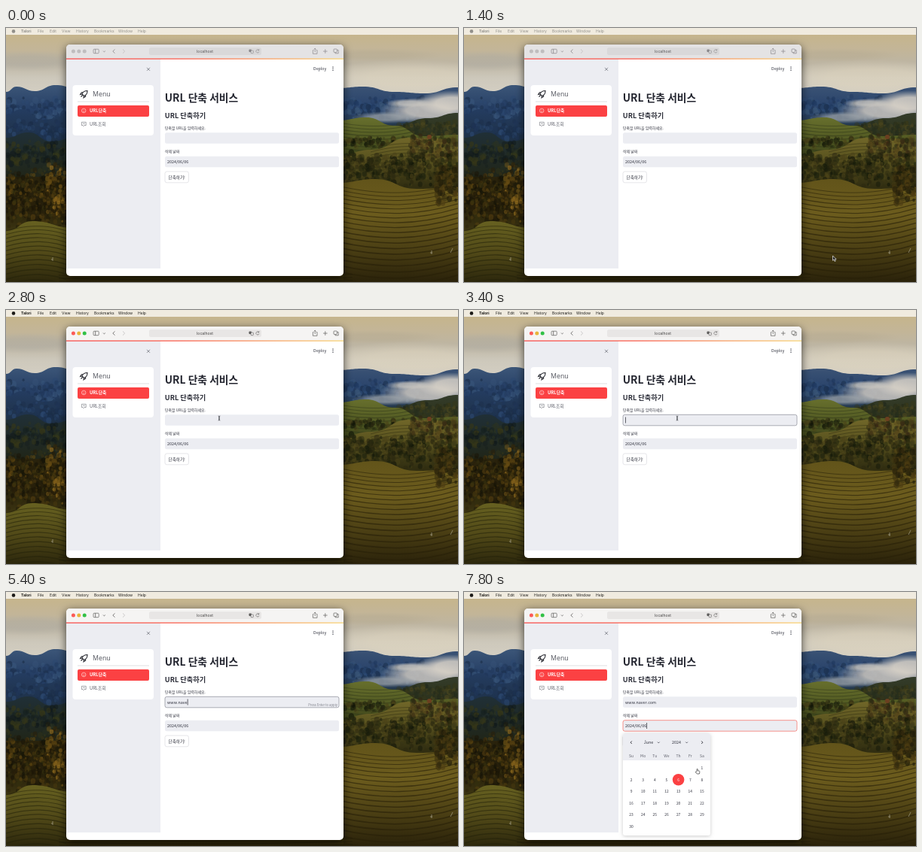
An HTML page with a canvas that plays this animation: 600 by 338 pixels, repeating every 8000 ms.

```html
<!DOCTYPE html>
<html lang="ko">
<head>
<meta charset="utf-8">
<style>
html, body { margin: 0; width: 100%; height: 100%; overflow: hidden; }
canvas { display: block; width: 600px; height: 338px; }
</style>
</head>
<body>
<canvas id="stage" width="600" height="338"></canvas>
<script>
const W = 600, H = 338, LOOP = 8000, STEP = 200;
const SANS = '"Noto Sans CJK KR", "Noto Sans CJK JP", "Noto Sans CJK", sans-serif';
const UI = 'Inter, sans-serif';
const INK = '#31333f', RED = '#fb4143', FIELD = '#ecedf2';
const stage = document.getElementById('stage').getContext('2d');
let g = stage;

// ---------- helpers ----------
let seed = 7;
const rand = () => (seed = (seed * 16807) % 2147483647) / 2147483647;

function text(s, x, y, size, color = INK, weight = 400, family = SANS, align = 'left') {
  g.font = `${weight} ${size}px ${family}`;
  g.fillStyle = color;
  g.textAlign = align;
  g.fillText(s, x, y);
}

function box(x, y, w, h, r, fill, stroke, width = 0.7) {
  g.beginPath();
  g.roundRect(x, y, w, h, r);
  if (fill) { g.fillStyle = fill; g.fill(); }
  if (stroke) { g.strokeStyle = stroke; g.lineWidth = width; g.stroke(); }
}

function dot(x, y, r, fill) {
  g.beginPath();
  g.arc(x, y, r, 0, 7);
  g.fillStyle = fill;
  g.fill();
}

function line(d, color, width = 0.8, fill) {
  const path = new Path2D(d);
  if (fill) { g.fillStyle = fill; g.fill(path); }
  g.strokeStyle = color;
  g.lineWidth = width;
  g.stroke(path);
}

function gradient(y0, y1, ...colors) {
  const fill = g.createLinearGradient(0, y0, 0, y1);
  colors.forEach((c, i) => fill.addColorStop(i / (colors.length - 1), c));
  return fill;
}

// ---------- landscape ----------
function ridge(points, fill, bottom) {
  g.beginPath();
  g.moveTo(points[0][0], bottom);
  g.lineTo(...points[0]);
  for (let i = 1; i < points.length; i++) {
    const [ax, ay] = points[i - 1], [bx, by] = points[i], mid = (ax + bx) / 2;
    g.bezierCurveTo(mid, ay, mid, by, bx, by);
  }
  g.lineTo(points[points.length - 1][0], bottom);
  g.fillStyle = fill;
  g.fill();
}

function foliage(x, y, w, h, count, colors, size) {
  for (let i = 0; i < count; i++) {
    const depth = i / count, r = size * (0.5 + rand());
    g.globalAlpha = 0.3 + rand() * 0.4;
    g.beginPath();
    g.ellipse(x + rand() * w, y + h * (depth * 0.7 + rand() * 0.3), r, r * 1.2, 0, 0, 7);
    g.fillStyle = colors[Math.floor(rand() * colors.length)];
    g.fill();
  }
  g.globalAlpha = 1;
}

function haze(x, y, rx, ry, color) {
  g.save();
  g.translate(x, y);
  g.scale(rx, ry);
  const fill = g.createRadialGradient(0, 0, 0, 0, 0, 1);
  fill.addColorStop(0, color);
  fill.addColorStop(0.45, color);
  fill.addColorStop(1, color.slice(0, 7) + '00');
  g.fillStyle = fill;
  g.fillRect(-1, -1, 2, 2);
  g.restore();
}

function rows(x, w, y, gap, count, bend, color) {
  g.strokeStyle = color;
  for (let i = 0; i < count; i++) {
    const top = y + gap * i * (1 + i * 0.02);
    g.lineWidth = 0.9 + i * 0.06;
    g.beginPath();
    g.moveTo(x, top);
    g.bezierCurveTo(x + w * 0.35, top + bend, x + w * 0.65, top + bend, x + w, top - bend * 0.4);
    g.stroke();
  }
}

function drawSky() {
  g.fillStyle = gradient(8, 86, '#c6b58c', '#c3b597', '#bdb5a3', '#cdc8bb', '#d3cec2');
  g.fillRect(0, 0, W, H);
  haze(540, 66, 130, 24, '#e0d6bf88');
  haze(30, 44, 80, 14, '#a9a79f66');
  haze(490, 36, 90, 9, '#b3a88f66');
}

function drawLeftHills() {
  const blues = ['#1f3558', '#2c4870', '#1b2e49', '#38557a'];
  const deep = ['#18211f', '#2a3220', '#111a1b', '#363718'];
  const autumn = ['#1a1507', '#2a210b', '#4b390f', '#131207', '#654a12', '#35300f'];
  ridge([[0, 85], [14, 78], [38, 84], [66, 76], [100, 82]], gradient(76, 140, '#3c5678', '#263f65', '#1c3048'), 240);
  foliage(0, 90, 80, 50, 130, blues, 3);
  ridge([[0, 116], [20, 108], [48, 122], [100, 111]], gradient(108, 160, '#243c60', '#1c2d40'), 240);
  foliage(0, 122, 80, 28, 80, blues.slice(0, 3), 2.5);
  ridge([[0, 146], [30, 139], [60, 151], [100, 143]], gradient(140, 195, '#202f36', '#20261a'), 240);
  foliage(0, 148, 80, 44, 150, deep, 2.8);
  g.fillStyle = gradient(190, H, '#2a240d', '#251e0a', '#4b4316', '#2c270c');
  g.fillRect(0, 198, 90, 140);
  foliage(0, 184, 80, 84, 420, autumn, 2.2);
  ridge([[0, 270], [35, 257], [90, 266]], gradient(258, H, '#666020', '#524a18', '#2c270c'), H);
  rows(0, 90, 270, 4.8, 14, -9, '#26230a99');
  foliage(54, 172, 26, 92, 120, ['#80601a', '#33270b', '#5d4512', '#936d20', '#241c09'], 2.2);
}

function drawRightHills() {
  const grove = ['#1c210d', '#353214', '#141809', '#4b4319', '#2b2810'];
  ridge([[440, 80], [474, 78], [516, 85], [556, 87], [W, 79]], gradient(78, 135, '#3a5274', '#28426a', '#26394a'), 180);
  foliage(448, 90, 105, 32, 150, ['#1f385f', '#2f4c76', '#1b2f4c', '#3a5677'], 3);
  haze(560, 110, 64, 18, '#c9c5bfdd');
  haze(505, 119, 46, 8, '#a9aeb1aa');
  haze(592, 100, 48, 17, '#d6d0c6dd');
  haze(535, 100, 32, 6, '#d0ccc4aa');
  ridge([[440, 128], [478, 122], [516, 130], [560, 120], [W, 113]], gradient(112, 150, '#343c2a', '#2b301a'), 210);
  foliage(520, 122, 80, 24, 120, ['#22291b', '#383819', '#4b461f', '#272e1c'], 2.3);
  ridge([[440, 123], [478, 119], [516, 130], [555, 144], [W, 142]], gradient(120, 180, '#666e2c', '#515922', '#353b17'), 220);
  rows(448, 92, 127, 4.2, 8, 5, '#30381988');
  foliage(448, 145, 88, 15, 90, grove, 2.2);
  ridge([[440, 170], [485, 162], [535, 146], [570, 147], [W, 154]], gradient(145, 210, '#716729', '#57511e', '#312e11'), 240);
  g.save();
  g.beginPath();
  g.rect(484, 150, 70, 48);
  g.clip();
  rows(480, 120, 162, 4, 10, -12, '#32301288');
  g.restore();
  foliage(536, 139, 64, 40, 150, ['#382713', '#302d14', '#5b4a1c', '#20220f'], 2.4);
  dot(562, 145, 3, '#6b3f20');
  foliage(448, 164, 152, 48, 440, grove, 2.6);
  ridge([[440, 206], [490, 201], [545, 214], [W, 212]], gradient(202, H, '#62541a', '#6c5c1d', '#4c4014', '#2a220a'), H);
  rows(440, 165, 210, 5, 22, 13, '#282009a0');
  foliage(570, 178, 30, 58, 110, ['#1e1b0a', '#332b0e', '#4f3e13'], 2.7);
}

function drawLandscape() {
  drawSky();
  drawLeftHills();
  drawRightHills();
  g.fillStyle = gradient(324, H, '#43390f', '#2a230a');
  g.fillRect(80, 324, 368, 14);
  rows(70, 390, 329, 4, 3, 3, '#221d08aa');
  line('M62 305v5m-2-2h2M565 296v5m-2-2h3M593 293l-3 6', '#a8a28a', 0.7);
  g.fillStyle = '#f0ebdf';
  g.fillRect(0, 0, W, 9);
}

// ---------- browser ----------
const MENU = [['Talori', 20], ['File', 42], ['Edit', 58], ['View', 74], ['History', 93],
  ['Bookmarks', 117], ['Window', 149], ['Help', 175]];

function drawMenuBar(active) {
  const color = active ? '#1d1b18' : '#92908b';
  dot(10, 4.4, 2.3, color);
  MENU.forEach(([label, x], i) => text(label, x, 6.3, 5, color, i ? 400 : 700, UI));
}

function drawToolbar(active) {
  const field = active ? '#e8e6e5' : '#d9d8d9';
  box(80, 22, 368, 25, [5, 5, 0, 0], active ? '#f5f4f3' : '#e4e3e4');
  const lights = active ? ['#fc5b57', '#e8b43a', '#32c146'] : ['#bfbdbe', '#bfbdbe', '#bfbdbe'];
  lights.forEach((c, i) => dot(89.4 + i * 7.4, 31, 2.5, c));
  const icon = active ? '#5d5c5b' : '#88868a';
  box(116, 28.2, 7.2, 5.5, 1, null, icon);
  line('M118.7 28.2v5.5M129 30.5l1.4 1.4 1.4-1.4M144.5 28.4l-2.7 2.6 2.7 2.6', icon);
  line('M155 28.4l2.7 2.6-2.7 2.6', '#c0bebf');
  box(190, 26, 149, 10, 2.5, field);
  text('localhost', 264, 33, 5.1, active ? '#424140' : '#555356', 400, UI, 'center');
  box(322.5, 28.5, 3.4, 3.6, 0.8, icon);
  box(325, 30, 3.4, 3.6, 0.8, field, icon, 0.6);
  line('M335.6 29.5a2.1 2.1 0 1 0 .4 2M335.8 28v1.8h-1.8', icon, 0.6);
  line('M408.4 29.5h-1v4.8h5.6v-4.8h-1M410.2 32v-5m-1.4 1.4l1.4-1.4 1.4 1.4M421 31h5.6M423.8 28.2v5.6', icon, 0.7);
  box(435, 28, 4.4, 4.4, 0.8, null, icon);
  line('M437 32.4v1.4h4.2v-4.4h-1.8', icon, 0.7);
}

function drawSidebar() {
  g.fillStyle = '#ecedf2';
  g.fillRect(80, 41, 125, 279);
  line('M187 52.8l4 4m0-4l-4 4', '#5e606b', 0.7);
  box(88.5, 76, 107.5, 67, 4, '#fff');
  line('M101 88c1-3 4-4.5 7-4.5 0 3-1.5 6-4.5 7zM101 88l-2.4.5 1.7-2.7h2M103.5 90.5l-.5 2.4 2.6-1.7v-2M99.5 91.5l2-2', '#2b2c33', 1.1);
  text('Menu', 115, 91.3, 8.8, '#51535c', 400, '"Open Sans", "Noto Sans", sans-serif');
  line('M95 98h95', '#c9cace', 0.6);
  box(95, 103, 95, 15, 2, RED);
  line('M106 110a2.8 2.8 0 1 1-5.6 0a2.8 2.8 0 1 1 5.6 0M101.8 110.7q1.4 1.7 2.8 0M102 109h.6m1.1 0h.6', '#ffd0ce', 0.7);
  text('URL단축', 111, 112.2, 5.8, '#fff', 700);
  line('M100.4 125.3h5.8v4.2h-2.2l-1 1.3-1-1.3h-1.6zM102 127.3h2.8', '#6b6c74', 0.6);
  text('URL조회', 111, 130.2, 5.8, '#5b5d67');
}

function caret(x, y) {
  g.fillStyle = '#22232c';
  g.fillRect(x, y, 0.7, 8);
}

function drawPage(typed, urlFocus, dateFocus) {
  text('Deploy', 408, 56.3, 5.3, INK, 500);
  for (const y of [52, 54.2, 56.4]) dot(434, y, 0.65, INK);
  text('URL 단축 서비스', 210.8, 98, 13.8, '#23252f', 700);
  text('URL 단축하기', 210.8, 120.2, 9.2, '#2b2d38', 600);
  text('단축할 URL을 입력하세요.', 211, 135, 4.95, INK, 500);
  box(211, 139.3, 231, 14.5, 2.5, FIELD, urlFocus && '#898b95');
  text(typed, 214, 148.8, 5.4);
  if (urlFocus) caret(214.2 + g.measureText(typed).width, 142.5);
  if (urlFocus && typed) text('Press Enter to apply', 440, 152.3, 4.2, '#7d7f88', 400, SANS, 'right');
  text('삭제 날짜', 211, 166, 4.95, INK, 500);
  box(211, 170.7, 231, 14.5, 2.5, FIELD, dateFocus && '#f7685e');
  text('2024/06/06', 214, 180, 5.4);
  if (dateFocus) caret(214.2 + g.measureText('2024/06/06').width, 174);
  box(211, 191, 31.5, 14.8, 2.5, '#fff', '#d5d6da', 0.6);
  text('단축하기!', 226.7, 200.5, 5.6, INK, 500, SANS, 'center');
}

function drawCalendar() {
  const column = i => 222 + i * 15.65;
  const label = (s, x, y, size = 4.9, color = INK) => text(s, x, y, size, color, 500, SANS, 'center');
  g.save();
  g.shadowColor = '#0003';
  g.shadowBlur = 5;
  g.shadowOffsetY = 1;
  box(211, 188, 116, 136, 3, '#fff');
  g.restore();
  box(211, 188, 116, 36, [3, 3, 0, 0], FIELD);
  line('M222.8 198.4l-1.7 1.8 1.7 1.8M315.2 198.4l1.7 1.8-1.7 1.8', '#292a33', 0.9);
  label('June', 245, 202, 5.5);
  label('2024', 282, 202, 5.4);
  line('M257 199.6l1.3 1.3 1.3-1.3M294.3 199.6l1.3 1.3 1.3-1.3', INK, 0.8);
  ['Su', 'Mo', 'Tu', 'We', 'Th', 'Fr', 'Sa'].forEach((s, i) => label(s, column(i), 219.8, 5.1, '#60626d'));
  for (let day = 1; day <= 30; day++) {
    const cell = day + 5, x = column(cell % 7), y = 234.2 + Math.floor(cell / 7) * 15.6;
    if (day === 6) dot(x, y, 7.8, RED);
    label(day, x, y + 1.8, 4.9, day === 6 ? '#fff' : INK);
  }
}

// ---------- pointer ----------
const POINTERS = {
  arrow: ['M0 0v6.4l1.5-1.3 1.1 2.5 1.2-.6-1.1-2.3h2z', '#eee', '#222'],
  beam: ['M-1.3-3q1.3 0 1.3 1v4q0 1-1.3 1M1.3-3q-1.3 0-1.3 1v4q0 1 1.3 1', '#33343b'],
  hand: ['M-1 .8v-3q.7-1 1.3 0v2l2 .4q.8.3.6 1.3l-.6 2.5h-3l-2-2.2q0-1.1 1-.6z', '#333', '#fff']
};
// time, x, y, shape; a null shape hides the pointer
const TRACK = [
  [0, 491, 306, null], [1000, 497, 334, 'arrow'], [1200, 491, 306, 'arrow'], [1600, 491, 306, 'arrow'],
  [2400, 283, 147, 'beam'], [2600, 283, 144, 'beam'], [3800, 283, 144, null],
  [6800, 283, 144, 'beam'], [7200, 242, 177, 'beam'], [7400, 242, 178, 'beam'],
  [7600, 274, 205, 'hand'], [7800, 310, 238, 'hand'], [8000, 310, 238, 'hand']
];

function drawPointer(t) {
  const i = TRACK.findIndex((p, n) => n < TRACK.length - 1 && t < TRACK[n + 1][0]);
  const [t0, x0, y0, shape] = TRACK[i], [t1, x1, y1] = TRACK[i + 1];
  if (!shape) return;
  const k = (t - t0) / (t1 - t0), e = k * k * (3 - 2 * k);
  g.save();
  g.translate(x0 + (x1 - x0) * e, y0 + (y1 - y0) * e);
  if (shape === 'arrow') g.translate(-1.5, -3);
  const [path, stroke, fill] = POINTERS[shape];
  line(path, stroke, 0.7, fill);
  g.restore();
}

// ---------- timeline ----------
const ADDRESS = 'www.naver.com';
const KEYS = [[3800, 1], [4000, 2], [4200, 3], [4400, 4], [4800, 5], [5200, 6],
  [5400, 8], [5600, 9], [5800, 10], [6000, 12], [6200, 13]];

const scenery = document.createElement('canvas');
scenery.width = W;
scenery.height = H;
g = scenery.getContext('2d');
drawLandscape();
g = stage;

function drawWindow(active, t) {
  g.save();
  g.shadowColor = '#000a';
  g.shadowBlur = 12;
  g.shadowOffsetY = 3;
  box(80, 22, 368, 308, 5, '#fff');
  g.restore();
  drawToolbar(active);
  g.fillStyle = '#fff';
  g.fillRect(80, 41, 368, 20);
  drawSidebar();
  const stripe = g.createLinearGradient(80, 0, 448, 0);
  stripe.addColorStop(0, '#f84e4c');
  stripe.addColorStop(0.4, '#f96050');
  stripe.addColorStop(1, '#f8d477');
  g.fillStyle = stripe;
  g.fillRect(80, 40.4, 368, 1.3);
  const count = KEYS.reduce((n, [at, size]) => t >= at ? size : n, 0);
  const calendar = t >= 7400;
  drawPage(ADDRESS.slice(0, count), t >= 3200 && !calendar, calendar);
  if (calendar) drawCalendar();
}

function render(now) {
  const t = Math.floor((now % LOOP) / STEP) * STEP;
  const active = t >= 2600;
  g.drawImage(scenery, 0, 0);
  drawMenuBar(active);
  drawWindow(active, t);
  drawPointer(t);
}

const start = performance.now();
function tick() {
  render(performance.now() - start);
  requestAnimationFrame(tick);
}
tick();
</script>
</body>
</html>
```
